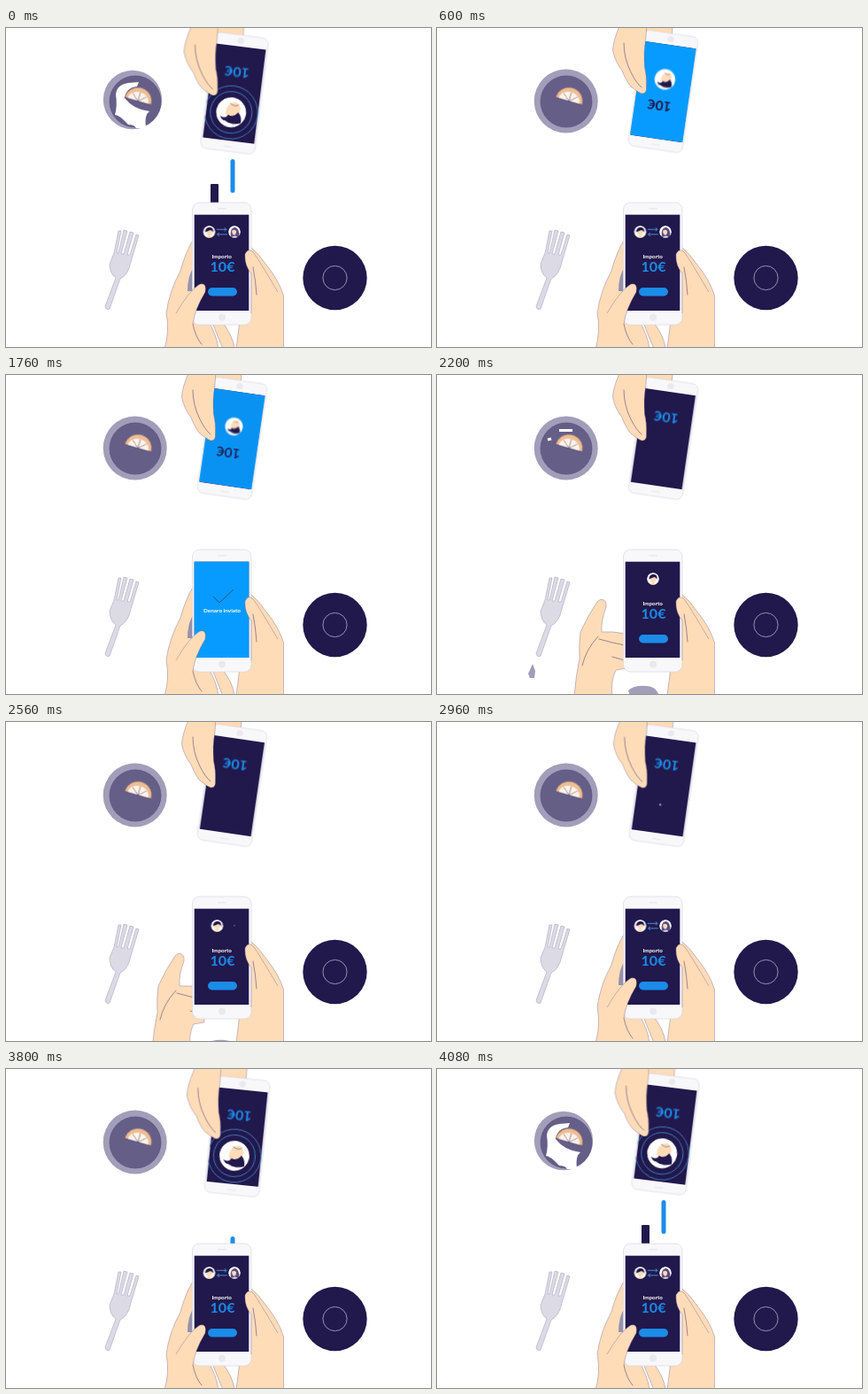
An HTML page for the animation above (4120 ms loop, 480 by 360 pixels).

```html
<!DOCTYPE html>
<html lang="it">
<head>
<meta charset="utf-8">
<title>Invio denaro</title>
<style>
html, body { margin: 0; width: 100%; height: 100%; overflow: hidden; background: #fff; }
svg { display: block; width: 480px; height: 360px; }
text { font-family: Lato, sans-serif; font-weight: 700; text-anchor: middle; }
.skin { fill: #ffdcb8; stroke: #6d618c; stroke-width: .4; }
.line { fill: none; stroke: #54477a; stroke-width: .6; stroke-linecap: round; }
.body { fill: #f8f8fb; stroke: #d4d2de; stroke-width: .6; }
.grey { fill: #a29db9; }
.dark { fill: #21184c; }
.blue { fill: #089bff; }
.deep { fill: #1b8ce8; }
.trim { fill: #e9e9ef; }

/* every part shares one clock */
.a { animation: 4.12s ease-in-out infinite; }
.cut { animation-timing-function: step-end; }

.top { animation-name: top; }
@keyframes top {
  0%, 1%, 99%, 100% { transform: translate(2.5px, 2px); }
  10%, 70% { transform: none; }
  71.84% { transform: translate(.7px, .3px); }
  80%, 86% { transform: translate(8.5px, 7px); }
}
.tilt { animation-name: tilt; }
@keyframes tilt {
  0%, 1%, 99%, 100% { transform: rotate(7.1deg); }
  10%, 70% { transform: rotate(8.3deg); }
  71.84% { transform: rotate(8deg); }
  80%, 86% { transform: rotate(4.7deg); }
}
.flood { animation-name: flood; }
@keyframes flood {
  0%, 5% { transform: scale(0); opacity: 1; }
  11%, 42% { transform: scale(1); opacity: 1; }
  46% { transform: scale(1); opacity: 0; }
  46.1%, 100% { transform: scale(0); opacity: 0; }
}
.paid { animation-name: paid; }
@keyframes paid { 0%, 9% { opacity: 0; } 12%, 42% { opacity: 1; } 45%, 100% { opacity: 0; } }
.due { animation-name: due; }
@keyframes due { 0%, 6% { opacity: 1; } 9%, 43% { opacity: 0; } 47%, 100% { opacity: 1; } }
.payee { animation-name: payee; }
@keyframes payee {
  0%, 3% { transform: translate(-1px, 22px) scale(1); }
  11%, 42% { transform: translate(0, -13.6px) scale(.7); }
  45% { transform: translate(0, -13.6px) scale(0); }
  45.1%, 71.2% { transform: translate(-1px, 22px) scale(0); animation-timing-function: linear; }
  71.84% { transform: translate(-1px, 22px) scale(.08); }
  76%, 100% { transform: translate(-1px, 22px) scale(1); }
}
.rings { animation-name: rings; }
@keyframes rings {
  0%, 3% { transform: scale(1); opacity: 1; }
  7% { transform: scale(1.2); opacity: 0; }
  7.1%, 75% { transform: scale(.5); opacity: 0; }
  81%, 100% { transform: scale(1); opacity: 1; }
}
.beam { animation-name: beam; }
@keyframes beam {
  0%, 1% { transform: none; opacity: 1; }
  8% { transform: translateY(-75px); opacity: 1; }
  8.1%, 89% { transform: translateY(52px); opacity: 0; }
  89.1% { transform: translateY(52px); opacity: 1; }
  99%, 100% { transform: none; opacity: 1; }
}
.beam.late { animation-name: late; }
@keyframes late {
  0%, 1% { transform: none; opacity: 1; }
  12% { transform: translateY(-90px); opacity: 1; }
  12.1%, 92% { transform: translateY(30px); opacity: 0; }
  92.1% { transform: translateY(30px); opacity: 1; }
  99%, 100% { transform: none; opacity: 1; }
}
.sent { animation-name: sent; }
@keyframes sent { 0%, 18% { opacity: 0; } 22%, 43% { opacity: 1; } 47%, 100% { opacity: 0; } }
.check { stroke-dasharray: 32; animation-name: check; }
@keyframes check { 0%, 23% { stroke-dashoffset: 32; } 29%, 100% { stroke-dashoffset: 0; } }
.me { animation-name: me; }
@keyframes me {
  0%, 43% { transform: translate(229.5px, 230px); }
  47%, 60% { transform: translate(244px, 230px); }
  65%, 100% { transform: translate(229.5px, 230px); }
}
.friend { animation-name: friend; }
@keyframes friend {
  0%, 43% { transform: scale(1); }
  46%, 61% { transform: scale(0); }
  66%, 100% { transform: scale(1); }
}
.hold { animation-name: hold; }
@keyframes hold {
  0%, 43% { transform: none; visibility: visible; }
  47%, 62.6% { transform: translate(-20px, 8px); visibility: hidden; }
  66%, 100% { transform: none; visibility: visible; }
}
.reach { animation-name: reach; }
@keyframes reach {
  0%, 46.9% { transform: translate(10px, 8px); visibility: hidden; }
  47% { transform: translate(10px, 8px); visibility: visible; }
  52%, 58% { transform: none; visibility: visible; }
  62.5% { transform: translate(10px, 8px); visibility: visible; }
  62.6%, 100% { transform: translate(10px, 8px); visibility: hidden; }
}
.thumb { animation-name: thumb; }
@keyframes thumb {
  0%, 76%, 91%, 100% { d: path("M277 322L277 277Q269 268 270 255Q274 247 280 254Q287 264 307 298"); }
  81.5%, 86% { d: path("M277 322L276 306Q266 296 256 293Q251 285 260 285Q276 288 296 291"); }
}
.button { transform-box: fill-box; transform-origin: center; animation-name: button; }
@keyframes button {
  0%, 79%, 89%, 100% { transform: none; fill: #1b8ce8; }
  82%, 86% { transform: scale(.88); fill: #1b74d2; }
}
.press { animation-name: press; }
@keyframes press { 0% { opacity: 0; } 82% { opacity: 1; } 86%, 100% { opacity: 0; } }
.shine1 { animation-name: shine1; }
@keyframes shine1 { 0% { opacity: 1; } 6% { opacity: 0; } 95%, 100% { opacity: 1; } }
.shine2 { animation-name: shine2; }
@keyframes shine2 { 0% { opacity: 0; } 23% { opacity: 1; } 36%, 100% { opacity: 0; } }
.shine3 { animation-name: shine3; }
@keyframes shine3 { 0% { opacity: 0; } 47% { opacity: 1; } 58%, 100% { opacity: 0; } }
.shine4 { animation-name: shine4; }
@keyframes shine4 { 0% { opacity: 0; } 79% { opacity: 1; } 90%, 100% { opacity: 0; } }
.drop { animation-name: drop; }
@keyframes drop { 0% { opacity: 0; } 48% { opacity: 1; } 60% { opacity: 0; } 80% { opacity: 1; } 89%, 100% { opacity: 0; } }
</style>
</head>
<body>
<svg viewBox="0 0 480 360">
  <defs>
    <clipPath id="screen"><rect x="-29.5" y="-53" width="59" height="107"/></clipPath>
    <clipPath id="disc"><circle r="17"/></clipPath>
    <g id="man" clip-path="url(#disc)">
      <circle r="17" fill="#fff"/>
      <path d="M-6 3Q-7-7 0-11Q9-14 10-4Q9 5 3 7Z" fill="#ffdcb8"/>
      <path class="dark" d="M-12 5Q-6 9-3 3Q3 6 8-1Q13 4 12 11Q2 15-6 10Q-10 10-12 5Z"/>
      <path class="line" d="M-2-10Q3-6 7-9"/>
    </g>
    <g id="face" clip-path="url(#disc)">
      <circle r="17" fill="#fff"/>
      <path d="M-8-4Q0-12 9-3Q9 9 2 11L9 18H-10L-3 11Q-9 6-8-4Z" fill="#ffdcb8"/>
      <path class="dark" d="M-11 1Q-12-12 1-13Q13-12 11 2Q8-5 3-5Q-5-2-11 1Z"/>
    </g>
    <g id="girl" clip-path="url(#disc)">
      <circle r="17" fill="#fff"/>
      <path d="M-10 14Q-14-10 1-13Q15-10 13 15Z" fill="#5b4b80"/>
      <path d="M-7-3Q0-8 5-2Q5 8-1 9Q-7 7-7-3Z" fill="#ffdcb8"/>
      <path d="M-9 18Q-5 9 6 12L10 18Z" fill="#d9d2e6"/>
    </g>
  </defs>

  <!-- glass -->
  <circle class="grey" cx="145.7" cy="82.5" r="36"/>
  <g class="a cut shine1">
    <circle cx="145.7" cy="82.5" r="36.6" fill="#fff"/>
    <circle class="grey" cx="143" cy="81" r="33.2"/>
  </g>
  <circle cx="146" cy="83" r="29" fill="#655f88" stroke="#4f497a" stroke-width=".6"/>
  <g fill="none" stroke="#fff" stroke-width="4.5">
    <path class="a cut shine1" fill="#fff" stroke="none" d="M124 75Q125 64 138 62L150 61L148 66Q136 67 134 79Q144 92 162 94Q156 98 158 113H147Q145 109 138 109Q128 98 123 98Q126 88 124 75Z"/>
    <path class="a cut shine2" d="M144 95.5H131Q124 72 135 65.5Q142 62 156 63.5"/>
    <path class="a cut shine3" stroke-width="3" d="M138 62.5H153M125 73L129 72"/>
    <path class="a cut shine4" stroke-width="4" d="M123.5 86Q122 70 136 66Q143 63 155 64"/>
  </g>
  <g transform="translate(149 82.5) rotate(16)">
    <path d="M-15.5 0A15.5 15.5 0 0 1 15.5 0Z" fill="#efbd91" stroke="#54477a" stroke-width=".4"/>
    <path d="M-12 0A12 10.5 0 0 1 12 0Z" fill="#fff3e7"/>
    <path class="line" d="M0 0L-8-7M0 0V-10M0 0L8-7M-15 0H15"/>
  </g>

  <!-- fork -->
  <path d="M127 229L122 254L117 266Q117 277 124 282L112 314Q113 319 117 317L129 283Q138 279 141 264L150 234L147 233L140 256H137L144 231L140 230L133 255H130L137 229L133 228L127 254H125L130 229Z" fill="#dcdae5" stroke="#a9a5bc" stroke-width=".6"/>
  <path class="grey a cut drop" d="M108 326L103 337L105 342L110 342L111 334Z"/>

  <!-- coaster -->
  <circle class="dark" cx="371.5" cy="282" r="36.2"/>
  <circle cx="371.5" cy="282" r="13.6" fill="none" stroke="#a59db9" stroke-width=".9"/>

  <!-- transfer -->
  <rect class="deep a beam" x="253.5" y="148" width="5" height="38" rx="2.5"/>
  <rect class="dark a beam late" x="231" y="176" width="9" height="36" rx="1"/>

  <!-- upper phone -->
  <g class="a top">
    <path class="skin" d="M211-22H268L265 10H232Z"/>
    <g transform="translate(255.5 71.5)"><g class="a tilt">
      <rect class="body" x="-31" y="-66" width="62" height="132" rx="7"/>
      <circle class="trim" cy="-59.5" r="3.6"/>
      <rect class="trim" x="-5" y="60" width="10" height="1.6" rx=".8"/>
      <g clip-path="url(#screen)">
        <rect class="dark" x="-29.5" y="-53" width="59" height="107"/>
        <g class="a due"><text class="deep" transform="translate(0 -23.5) rotate(180)" y="5.8" font-size="16">10€</text></g>
        <g transform="translate(-1 22)"><g class="a rings" fill="none" stroke="#3f83c8" stroke-width=".9">
          <circle r="23.5"/><circle r="30"/>
        </g></g>
        <g transform="translate(0 5)"><circle class="blue a flood" r="72"/></g>
        <g class="a paid"><text class="dark" transform="translate(-2 17) rotate(180)" y="5.6" font-size="15.5">10€</text></g>
        <g class="a payee"><use href="#man"/></g>
      </g>
    </g></g>
    <path class="skin" d="M211-22L206-2Q199 14 198.5 25Q201 38 209 48Q214 61 219 66Q226 72 231 74Q237 75 236.5 66Q237 54 234.5 44Q233 28 236 10L238-22Z"/>
    <path class="line" d="M211 17Q211 34 219 50Q225 62 231 67"/>
  </g>

  <!-- hands behind the lower phone -->
  <g class="a hold">
    <path class="skin" d="M212 238Q203 252 197 274Q184 298 181 322Q185 342 179 362H240Q238 346 228 330H212Z"/>
    <path d="M212 270Q205 279 205 297H212Z" fill="#9692ae"/>
    <path class="skin" d="M232 330Q239 348 245 362H258Q257 348 243 330Z"/>
    <path class="line" d="M211 334Q214 349 221 357"/>
  </g>
  <g class="a reach">
    <path class="skin" d="M191 257Q187 250 181 256Q170 272 162 290Q160 305 161 320Q157 338 155 362H198Q196 345 202 333L214 331V292Q198 289 186 290Q185 278 191 262Z"/>
    <path class="line" d="M183 298Q197 302 212 305M182 295Q168 310 164 328M198 318L212 322"/>
    <path class="grey" d="M216 356Q222 350 237 351Q247 351 251 362H218Z"/>
  </g>
  <path class="skin" d="M276 247Q285 254 293 266Q308 284 313.5 302V362H260L264 330Z"/>

  <!-- lower phone -->
  <rect class="body" x="210.5" y="197" width="66.5" height="138" rx="8"/>
  <rect class="trim" x="239" y="203" width="10" height="1.6" rx=".8"/>
  <circle class="trim" cx="244" cy="326.5" r="4"/>
  <rect class="dark" x="212.7" y="210.7" width="61.6" height="108.3"/>
  <g class="a me"><use href="#face" transform="scale(.41)"/></g>
  <g transform="translate(258 230)"><g class="a friend"><use href="#girl" transform="scale(.41)"/></g></g>
  <g transform="translate(243.7 230)"><path class="a friend" d="M-6-2.7H5M3-4.7L5.3-2.7L3-.7M6 2.9H-5M-3 .9L-5.3 2.9L-3 4.9" fill="none" stroke="#4d9be0" stroke-width=".9"/></g>
  <text x="243.7" y="260" font-size="6.3" fill="#fff">Importo</text>
  <text class="deep" x="244.5" y="274.5" font-size="16">10€</text>
  <rect class="a button" x="228" y="293" width="33" height="9.5" rx="4.7"/>
  <path class="a cut press" d="M216 319L230 310L244 305L256 302.5L274.5 303V319Z" fill="#fff"/>
  <g class="a sent">
    <rect class="blue" x="212.7" y="210.7" width="61.6" height="108.3"/>
    <path class="a check" d="M234 250L241 257L257 242" fill="none" stroke="#23507f" stroke-width=".9"/>
    <text x="244" y="268" font-size="6.4" fill="#fff">Denaro inviato</text>
  </g>

  <!-- thumbs over the glass -->
  <g class="a hold">
    <path class="skin" d="M211 334Q213 318 225 298Q227 287 219 289Q207 296 192 322"/>
  </g>
  <path class="skin a thumb" d="M277 322L277 277Q269 268 270 255Q274 247 280 254Q287 264 307 298"/>
  <path class="line" d="M279 270Q282 285 283 301"/>
</svg>
</body>
</html>
```
